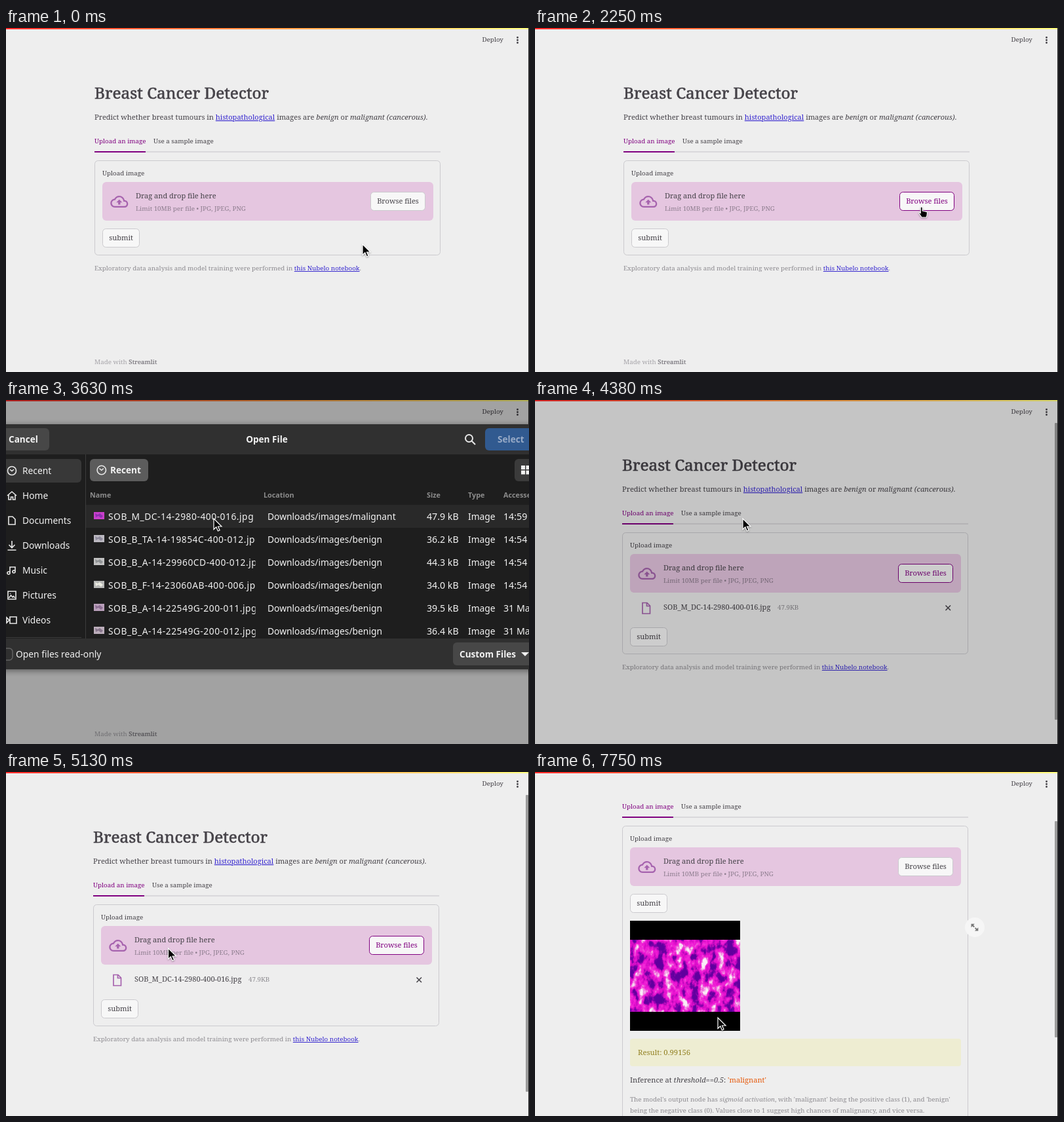
These frames come from a looping animation (798x525 px, 8 s). An HTML page:

```html
<!DOCTYPE html>
<html lang="en">
<head>
<meta charset="utf-8">
<title>Breast Cancer Detector</title>
<style>
html, body { margin: 0; width: 100%; height: 100%; overflow: hidden; background: #eee; }
svg { display: block; width: 100vw; height: 100vh; }
text { font: 11.06px "Noto Serif", serif; fill: #454248; }
.title { font-size: 24.4px; stroke: #454248; stroke-width: .6px; }
.small { font-size: 9.8px; }
.muted { fill: #8d8b90; }
.purple { fill: #800080; }
.link { fill: #3526cf; text-decoration: underline; }
.italic { font-style: italic; }
.button rect { fill: #f7f7f7; stroke: #cbcace; }
.button.hot rect { stroke: #800080; }
.button.hot text { fill: #800080; }
.button.active rect { fill: #800080; }
.button.active text { fill: #fff; }
#dialog text { font: 13.8px "Noto Sans", sans-serif; fill: #f2f2f2; }
#dialog .bold { font-size: 13.6px; font-weight: 700; }
#dialog .head { font-size: 10.8px; font-weight: 700; fill: #8c8c8c; }
#dialog .file { letter-spacing: .52px; }
#dialog .num { font-size: 14.2px; }
.icon { fill: none; stroke: #e8e8e8; stroke-width: 1.6; }
</style>
</head>
<body>
<svg viewBox="0 0 798 525" preserveAspectRatio="none">
  <defs>
    <linearGradient id="bar">
      <stop stop-color="#ff2b2b"/><stop offset=".5" stop-color="#ff9440"/><stop offset="1" stop-color="#fffd80"/>
    </linearGradient>
    <filter id="tissue" x="0" y="0" width="1" height="1" color-interpolation-filters="sRGB">
      <feTurbulence type="fractalNoise" baseFrequency=".075 .05" numOctaves="4" seed="8"/>
      <feColorMatrix values="2.3 0 0 0 -.72  2.3 0 0 0 -.72  2.3 0 0 0 -.72  0 0 0 0 1"/>
      <feComponentTransfer>
        <feFuncR type="table" tableValues=".38 .5 .82 .93 .94 .95 .98"/>
        <feFuncG type="table" tableValues="0 .01 .05 .08 .18 .6 .93"/>
        <feFuncB type="table" tableValues=".62 .67 .77 .83 .84 .89 .97"/>
      </feComponentTransfer>
    </filter>
    <clipPath id="nameClip"><rect x="122" y="150" width="258.5" height="214"/></clipPath>
    <clipPath id="listClip"><rect y="83" width="798" height="281"/></clipPath>
  </defs>

  <rect width="798" height="525" fill="#eee"/>

  <g id="page">
    <text class="title" x="135" y="108">Breast Cancer Detector</text>
    <text x="135" y="140">Predict whether breast tumours in <tspan class="link">histopathological</tspan> images are <tspan class="italic">benign</tspan> or <tspan class="italic">malignant (cancerous)</tspan>.</text>
    <text class="small purple" x="135" y="176">Upload an image</text>
    <text class="small" x="225" y="176">Use a sample image</text>
    <rect x="135" y="188" width="528" height="2" fill="#d9d8db"/>
    <rect x="135" y="188" width="78" height="2" fill="#800080"/>

    <rect id="card" x="135.5" y="202.5" width="527" height="144" rx="5" fill="none" stroke="#cbcace"/>
    <text class="small" x="147" y="225">Upload image</text>
    <rect x="147" y="235" width="505" height="59" rx="6" fill="#e5c6e0"/>
    <path transform="translate(159.3 251.5) scale(1.125)" fill="#a663ae" d="M19.35 10.04A7.49 7.49 0 0 0 12 4C9.11 4 6.6 5.64 5.35 8.04A6 6 0 0 0 0 14c0 3.31 2.69 6 6 6h13c2.76 0 5-2.24 5-5 0-2.64-2.05-4.78-4.65-4.96zM19 18H6c-2.21 0-4-1.79-4-4 0-2.05 1.53-3.76 3.56-3.97l1.07-.11.5-.95A5.47 5.47 0 0 1 12 6c2.62 0 4.88 1.86 5.39 4.43l.3 1.5 1.53.11A2.98 2.98 0 0 1 22 15c0 1.65-1.35 3-3 3zM8 13h2.55v3h2.9v-3H16l-4-4z"/>
    <text x="198" y="260">Drag and drop file here</text>
    <text class="small" x="198" y="279" style="fill:#8d7d8e">Limit 10MB per file • JPG, JPEG, PNG</text>
    <g id="browse" class="button">
      <rect x="556.5" y="250.5" width="83" height="28" rx="5"/>
      <text x="598" y="268" text-anchor="middle">Browse files</text>
    </g>

    <g id="upload">
      <path d="M166 309.5h7l4.5 4.5v12h-11.5zM172.5 310v4.5h4.5" fill="none" stroke="#a663ae" stroke-width="1.7"/>
      <text x="198" y="320">SOB_M_DC-14-2980-400-016.jpg</text>
      <text class="small muted" x="372" y="320">47.9KB</text>
      <path d="M628.5 313.5l7.5 7.5m0-7.5l-7.5 7.5" stroke="#454248" stroke-width="1.5"/>
    </g>

    <g id="submit" class="button">
      <rect x="147.5" y="306.5" width="56" height="28" rx="5"/>
      <text x="175.5" y="324" text-anchor="middle">submit</text>
    </g>
    <text id="note" class="small muted" x="135" y="370">Exploratory data analysis and model training were performed in <tspan class="link">this Nubelo notebook</tspan>.</text>

    <g id="result">
      <rect x="147" y="347" width="168" height="168"/>
      <rect x="147" y="376" width="168" height="110" filter="url(#tissue)"/>
      <circle cx="673" cy="357" r="15" fill="#f6f6f6"/>
      <path transform="translate(667.5 351.8) scale(1.35)" fill="#777" d="M0 0v4l1.5-1.5L3 4l1-1-1.5-1.5L4 0zM5 4 4 5l1.5 1.5L4 8h4V4L6.5 5.5z"/>
      <rect x="147" y="527" width="505" height="42" rx="4" fill="#eeedd2"/>
      <text x="159" y="552" style="fill:#928122;font-size:11.3px">Result: 0.99156</text>
      <text x="147" y="594">Inference at <tspan class="italic">threshold==0.5</tspan>: <tspan style="fill:#e65a0c">'malignant'</tspan></text>
      <text class="small muted" x="147" y="623">The model's output node has <tspan class="italic">sigmoid activation</tspan>, with 'malignant' being the positive class (1), and 'benign'</text>
      <text class="small muted" x="147" y="640">being the negative class (0). Values close to 1 suggest high chances of malignancy, and vice versa.</text>
    </g>
  </g>

  <text id="footer" class="small" x="135" y="513" style="fill:#a5a3a8">Made with <tspan style="fill:#77747b;stroke:#77747b;stroke-width:.2px">Streamlit</tspan></text>
  <rect width="798" height="35" fill="#eee"/>
  <text class="small" x="726.5" y="21">Deploy</text>
  <g fill="#454248"><circle cx="780.5" cy="14.5" r="1.4"/><circle cx="780.5" cy="18.5" r="1.4"/><circle cx="780.5" cy="22.5" r="1.4"/></g>
  <rect width="798" height="2" fill="url(#bar)"/>
  <rect id="thumb" x="793" y="35" width="4" rx="1" fill="#9c9c9c"/>
  <rect x="797" width="1" height="525" fill="#2b2b2b"/>
  <rect id="dim" width="798" height="525"/>

  <g id="dialog">
    <rect x="-20" y="37" width="840" height="374" fill="#303030" style="filter:drop-shadow(0 2px 5px rgba(0,0,0,.45))"/>
    <rect y="83" width="798" height="281" fill="#1e1e1e"/>
    <rect x="-8" y="43" width="74" height="34" rx="6" fill="#474747"/>
    <text class="bold" x="4" y="65">Cancel</text>
    <text class="bold" x="398" y="65" text-anchor="middle">Open File</text>
    <path class="icon" style="stroke-width:2" d="M711 63l5 5M712 58.5a5.5 5.5 0 1 1-11 0a5.5 5.5 0 1 1 11 0"/>
    <rect x="731" y="43" width="80" height="34" rx="6" fill="#315a90"/>
    <text class="bold" x="750" y="65" style="fill:#98abc7">Select</text>

    <rect x="-8" y="90" width="123" height="36" rx="6" fill="#383838"/>
    <g id="places"></g>
    <path d="M121.5 83v281M0 362.5h115" stroke="#3c3c3c"/>

    <rect x="128" y="90" width="89" height="34" rx="6" fill="#5c5c5c"/>
    <path class="icon" d="M152.5 107a6.7 6.7 0 1 1-13.4 0a6.7 6.7 0 1 1 13.4 0M142.5 104.5l3.3 2.8 3-2.8"/>
    <text class="bold" x="159" y="112">Recent</text>
    <rect x="776" y="90" width="40" height="34" rx="6" fill="#3b3b3b"/>
    <path fill="#f2f2f2" d="M786 100h6v6h-6zm7.5 0h6v6h-6zM786 107.5h6v6h-6zm7.5 0h6v6h-6z"/>

    <text class="head" x="128" y="149">Name</text>
    <text class="head" x="393" y="149">Location</text>
    <text class="head" x="642" y="149">Size</text>
    <text class="head" x="705" y="149">Type</text>
    <text class="head" x="759" y="149">Accessed</text>
    <g clip-path="url(#listClip)">
      <rect id="rowHover" x="122" width="676" height="35"/>
      <g id="files"></g>
    </g>

    <rect x="-8" y="379" width="18" height="18" rx="5" fill="none" stroke="#626262" stroke-width="1.5"/>
    <text x="15" y="393">Open files read-only</text>
    <rect x="682" y="370" width="130" height="35" rx="6" fill="#474747"/>
    <text class="bold" x="692" y="393">Custom Files</text>
    <path d="M786 385h12l-6 6z" fill="#f2f2f2"/>
  </g>

  <g id="cursor" fill="#000" stroke="#fff" stroke-width="1.2" style="filter:drop-shadow(.5px 1px 1px rgba(0,0,0,.35))">
    <path id="arrow" d="M0 0v16.5l3.8-3.6 2.6 6 2.7-1.1-2.6-5.8H12z"/>
    <path id="hand" transform="translate(-4 0)" d="M3.7 0q1.5 0 1.5 1.5V6l6.3 1.5q1 .3 1 1.5l-.4 4-1 3H4L0 10q-.5-1.6 1-1.5l1.2 1V1.5Q2.2 0 3.7 0z"/>
  </g>
</svg>

<script>
const LOOP = 8000, FRAME = 125, ROW = 35;
const $ = id => document.getElementById(id);
const show = (id, visible) => $(id).style.display = visible ? '' : 'none';
const clamp = v => Math.max(0, Math.min(1, v));
const progress = (t, from, to) => clamp((t - from) / (to - from));

const places = [
  ['Recent', 'M15.5 0a6.5 6.5 0 1 1-13 0a6.5 6.5 0 1 1 13 0M6 -2l3 2.5 3-2.5'],
  ['Home', 'M2 0l7-6 7 6M4 -1v7h3.5v-4h3v4H14v-7'],
  ['Documents', 'M4 -6h6l4 4v8H4z'],
  ['Downloads', 'M9 -7v10M4.5 -1L9 3.5 13.5 -1M2.5 7h13'],
  ['Music', 'M6 4v-9h8v7M6 4a2 2 0 1 1-4 0a2 2 0 1 1 4 0M14 2a2 2 0 1 1-4 0a2 2 0 1 1 4 0'],
  ['Pictures', 'M3 -6h12v12H3zM4.5 4l3-4 2.5 3 1.5-1.5 2 2.5M6.5 -3v1'],
  ['Videos', 'M6 -5h10v10H6zM1 -4l4 4-4 4z'],
];
$('places').innerHTML = places.map(([label, icon], i) => `
  <g transform="translate(0 ${108 + 38 * i})">
    <path class="icon" d="${icon}"/><text x="25" y="5">${label}</text>
  </g>`).join('');

const files = [
  ['SOB_M_DC-14-2980-400-016.jpg', 'malignant', '47.9', '14:59', '#c93fcb', '#8c2fb0'],
  ['SOB_B_TA-14-19854C-400-012.jpg', 'benign', '36.2', '14:54', '#bcb9c1', '#8e8a9c'],
  ['SOB_B_A-14-29960CD-400-012.jpg', 'benign', '44.3', '14:54', '#c2c2c2', '#8f9294'],
  ['SOB_B_F-14-23060AB-400-006.jpg', 'benign', '34.0', '14:54', '#b7b8b6', '#ecece2'],
  ['SOB_B_A-14-22549G-200-011.jpg', 'benign', '39.5', '31 May', '#b99fba', '#8b6d92'],
  ['SOB_B_A-14-22549G-200-012.jpg', 'benign', '36.4', '31 May', '#bcaebb', '#87758b'],
];
$('files').innerHTML = files.map(([name, folder, size, time, light, dark], i) => {
  const y = 183 + ROW * i;
  return `
    <rect x="134" y="${y - 12}" width="16" height="11" fill="${light}"/>
    <path d="M136 ${y - 10}l4 2 3-2 5 4-3 3-4-3-4 2z" fill="${dark}"/>
    <g clip-path="url(#nameClip)"><text class="file" x="156" y="${y}">${name}</text></g>
    <text x="399" y="${y}">Downloads/images/${folder}</text>
    <text class="num" x="642" y="${y}">${size} kB</text>
    <text x="705" y="${y}">Image</text>
    <text class="num" x="759" y="${y}">${time}</text>`;
}).join('');

// Pointer stops: time, x, y
const stops = [
  [250, 544, 330], [1125, 590, 273], [2625, 590, 273], [3250, 329, 207], [3625, 317, 181],
  [4750, 317, 181], [5500, 178, 357], [5750, 178, 357], [6375, 279, 375],
];
function pointerAt(t) {
  const next = stops.findIndex(stop => stop[0] > t);
  if (next === 0) return stops[0].slice(1);
  if (next < 0) return stops.at(-1).slice(1);
  const [t0, x0, y0] = stops[next - 1], [t1, x1, y1] = stops[next];
  const u = progress(t, t0, t1), eased = u * u * (3 - 2 * u);
  return [x0 + (x1 - x0) * eased, y0 + (y1 - y0) * eased];
}

function dimAt(t) {
  if (t < 4125) return .32 * (1 - (1 - progress(t, 2375, 2975)) ** 2);
  return .32 * (1 - progress(t, 4125, 4750)) ** 1.2;
}

function setButton(id, hot, active) {
  $(id).setAttribute('class', `button ${hot ? 'hot' : ''} ${active ? 'active' : ''}`);
}

function render(t) {
  const dialogOpen = t >= 2500 && t < 4125;
  const hasFile = t >= 4375 && t < 6250;
  const hasResult = t >= 6250;
  const scrollable = hasFile || hasResult;
  const scroll = progress(t, 7500, 7750);
  const shift = hasFile ? 41 : 0;
  const [x, y] = pointerAt(t);
  const over = (left, top, width, height) =>
    !dialogOpen && x >= left && x <= left + width && y >= top && y <= top + height;

  const overBrowse = over(556, 250, 84, 29);
  const overSubmit = over(145, 306 + shift, 57, 29);
  setButton('browse', overBrowse || t >= 2125 && t < 5750, t >= 2125 && t < 2250);
  setButton('submit', overSubmit, t >= 5750 && t < 5875);

  $('page').setAttribute('transform', `translate(${scrollable ? -2 : 0} ${-120 * scroll})`);
  $('card').setAttribute('height', hasResult ? 460 : 144 + shift);
  $('submit').setAttribute('transform', `translate(0 ${shift})`);
  $('note').setAttribute('transform', `translate(0 ${shift})`);
  show('upload', hasFile);
  show('result', hasResult);
  show('note', !hasResult);
  show('footer', !scrollable);
  show('thumb', scrollable);
  $('thumb').setAttribute('y', 35 + 40 * scroll);
  $('thumb').setAttribute('height', hasFile ? 453 : 295 + 35 * scroll);

  $('dim').setAttribute('opacity', dimAt(t));
  show('dialog', dialogOpen);
  $('rowHover').setAttribute('y', 160 + ROW * Math.floor((y - 160) / ROW));
  $('rowHover').setAttribute('fill', t >= 4000 ? '#25405f' : '#292929');

  $('cursor').setAttribute('transform', `translate(${x} ${y})`);
  show('hand', overBrowse || overSubmit);
  show('arrow', !overBrowse && !overSubmit);
}

const start = performance.now();
function tick() {
  const t = (performance.now() - start) % LOOP;
  render(Math.floor(t / FRAME) * FRAME);
  requestAnimationFrame(tick);
}
tick();
</script>
</body>
</html>
```
